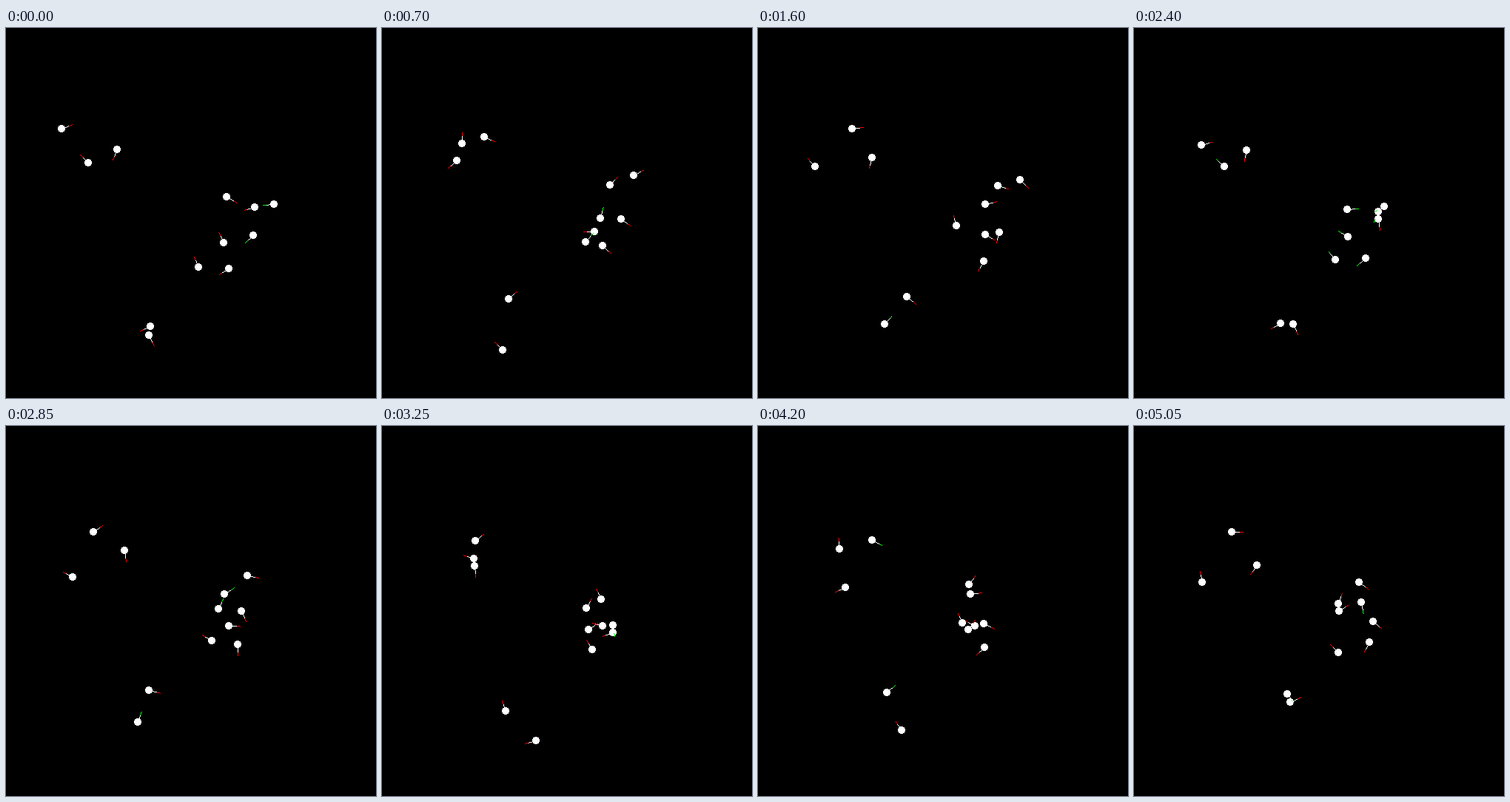
A matplotlib script that plays this animation: 500x500 px, repeating every 5100 ms.

```python
import numpy as np
import matplotlib.pyplot as plt
from matplotlib.animation import FuncAnimation

SIZE, DPI = 500, 100
STEP_MS, FRAMES = 50, 102
LAST = FRAMES - 2                 # the first pose is held for two frames
RADIUS, NOSE, REACH = 5, 10, 15   # body, white and coloured line ends
ORBIT = 22                        # radius of the circle each robot drives
WHITE, RED, GREEN = (255, 255, 255), (255, 0, 0), (0, 255, 0)


class Robot:
    """Reverses round a circle whose centre drifts steadily."""

    def __init__(self, start, end, heading, rate):
        self.start, self.end = np.array(start, float), np.array(end, float)
        self.heading, self.rate = heading, rate   # degrees, degrees per tick

    def pose(self, tick):
        angle = np.radians(self.heading - self.rate * tick)
        centre = self.start + (self.end - self.start) * tick / LAST
        way = np.array([np.cos(angle), np.sin(angle)])
        return centre + ORBIT * np.array([way[1], -way[0]]), way


ROBOTS = [
    # upper left group
    Robot((83, 156), (114, 206), 338, 15.2),
    Robot((130, 155), (132, 165), 113, 15.53),
    Robot((126, 166), (148, 175), 224, 15.38),
    # lower pair
    Robot((186, 383), (189, 375), 157, 15.42),
    Robot((173, 424), (220, 393), 65, 15.3),
    # right cluster
    Robot((287, 247), (292, 290), 30, 16.05),
    Robot((330, 221), (289, 264), 165, 16.4),
    Robot((360, 216), (291, 229), 176, 15.8),
    Robot((314, 281), (285, 242), 245, 16.05),
    Robot((319, 264), (297, 250), 138, 16.5),
    Robot((290, 306), (309, 281), 150, 15.5),
    Robot((280, 314), (299, 281), 247, 15.68),
]


def separate(pos):
    """Push overlapping robots apart."""
    for _ in range(4):
        for i in range(len(pos)):
            for j in range(i):
                gap = pos[i] - pos[j]
                dist = max(np.hypot(*gap), 0.01)
                if dist < 2 * RADIUS:
                    push = gap / dist * (RADIUS - dist / 2)
                    pos[i] += push
                    pos[j] -= push
    return pos


def sees(i, pos, way):
    """True if the line of sight of robot i meets another robot."""
    rel = np.delete(pos, i, axis=0) - pos[i]
    along = rel @ way
    off = np.abs(rel[:, 0] * way[1] - rel[:, 1] * way[0])
    return bool(np.any((along > 0) & (off < RADIUS - 1)))


def disc(canvas, x, y):
    rows, cols = np.mgrid[-RADIUS:RADIUS, -RADIUS:RADIUS]
    inside = (rows + 0.5) ** 2 + (cols + 0.5) ** 2 <= RADIUS ** 2
    canvas[y + rows[inside], x + cols[inside]] = WHITE


def line(canvas, x, y, way, near, far, color):
    """One-pixel line with hard edges, stepping along its longer axis."""
    slope = np.abs(way).max()
    steps = np.arange(round(near * slope), round(far * slope) + 1)
    cols, rows = np.rint(np.outer(way / slope, steps)).astype(int)
    canvas[y + rows, x + cols] = color


fig = plt.figure(figsize=(SIZE / DPI, SIZE / DPI), dpi=DPI, facecolor="black")
ax = fig.add_axes([0, 0, 1, 1])
ax.axis("off")
stage = ax.imshow(np.zeros((SIZE, SIZE, 3), np.uint8),
                  interpolation="nearest", aspect="auto")


def draw(frame):
    tick = max(0, frame - 1)
    spots, ways = zip(*(robot.pose(tick) for robot in ROBOTS))
    pos = separate(np.array(spots))
    pixels = np.rint(pos).astype(int)
    canvas = np.zeros((SIZE, SIZE, 3), np.uint8)
    for x, y in pixels:
        disc(canvas, x, y)
    for i, ((x, y), way) in enumerate(zip(pixels, ways)):
        tip = GREEN if sees(i, pos, way) else RED
        line(canvas, x, y, way, NOSE, REACH, tip)
        line(canvas, x, y, way, 0, NOSE, WHITE)
    stage.set_data(canvas)
    return [stage]


anim = FuncAnimation(fig, draw, frames=FRAMES, interval=STEP_MS,
                     init_func=lambda: draw(0), repeat=True, repeat_delay=0)
plt.show()
```
